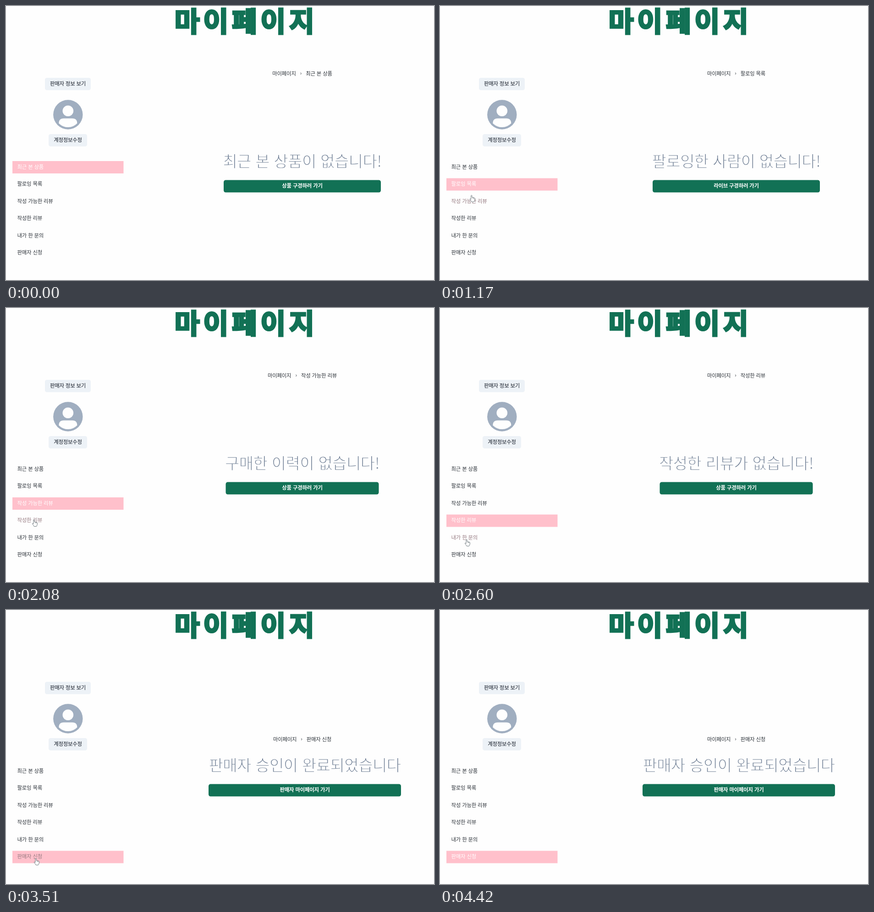
These frames come from a looping animation (934 by 599 pixels, 4550 ms). An HTML page with a canvas:

```html
<!DOCTYPE html>
<html lang="ko">
<head>
<meta charset="utf-8">
<title>마이페이지</title>
<style>
  html, body { margin: 0; width: 100%; height: 100%; overflow: hidden; background: #fefefe; }
  canvas { display: block; }
</style>
</head>
<body>
<canvas id="stage" width="934" height="599"></canvas>
<script>
const ctx = document.getElementById('stage').getContext('2d');
const LOOP = 4550, STEP = 130;
const FAMILY = '"Noto Sans CJK KR", "Noto Sans CJK", "Noto Sans CJK JP", sans-serif';
const PAPER = '#fefefe', GREEN = '#127155', PINK = '#ffc0cb', MIST = '#edf2f7';
const INK = '#2b3138', SLATE = '#718096', AVATAR = '#a0aec0';
const HOVER = [150, 122, 128];
const SMALL = 11.4, TRACKING = -0.019, WORD_GAP = 0.068;

const menu = ['최근 본 상품', '팔로잉 목록', '작성 가능한 리뷰', '작성한 리뷰', '내가 한 문의', '판매자 신청'];
const shop = '상품 구경하러 가기';
const pages = [
  { start: 0, title: '최근 본 상품이 없습니다!', button: shop, width: 343 },
  { start: 910, title: '팔로잉한 사람이 없습니다!', button: '라이브 구경하러 가기', width: 365 },
  { start: 1690, title: '구매한 이력이 없습니다!', button: shop, width: 334 },
  { start: 2340, title: '작성한 리뷰가 없습니다!', button: shop, width: 334 },
  { start: 2860, title: '문의한 내역이 없습니다!', button: shop, width: 334 },
  { start: 3510, title: '판매자 승인이 완료되었습니다', button: '판매자 마이페이지 가기', width: 420, center: 652, crumbY: 283 }
];

// Pointer stops: time, x, y
const pointer = [
  [390, 112, 399], [650, 67, 391], [910, 67, 391], [1300, 72, 431], [1560, 74, 441],
  [1690, 74, 434], [2080, 63, 470], [2340, 62, 468], [2600, 60, 513],
  [2860, 61, 507], [3120, 67, 550], [3770, 67, 550]
];

const smooth = u => u * u * (3 - 2 * u);
const rowY = i => 352 + 37.5 * i;

function pointerAt(t) {
  const i = pointer.findIndex((p, n) => n && t >= pointer[n - 1][0] && t <= p[0]);
  if (i < 0) return null;
  const [t0, x0, y0] = pointer[i - 1], [t1, x1, y1] = pointer[i];
  const u = smooth((t - t0) / (t1 - t0));
  return { x: x0 + (x1 - x0) * u, y: y0 + (y1 - y0) * u };
}

function setFont(weight, size, spacing, wordGap) {
  ctx.font = `${weight} ${size}px ${FAMILY}`;
  ctx.letterSpacing = `${spacing * size}px`;
  ctx.wordSpacing = `${wordGap * size}px`;
}

// Stem width of a weight, in em
const stems = {};
function stemOf(weight) {
  if (!stems[weight]) {
    setFont(weight, 400, 0, 0);
    const m = ctx.measureText('ㅣ');
    stems[weight] = (m.actualBoundingBoxLeft + m.actualBoundingBoxRight) / 400;
  }
  return stems[weight];
}

// Text centred vertically on y; an outline trims or thickens it to the wanted stem
function text(str, x, y, o = {}) {
  const { size = SMALL, weight = 400, stem, color = INK, back = PAPER,
          align = 'left', spacing = TRACKING } = o;
  const extra = stem ? stem - stemOf(weight) * size : 0;
  const base = y + 0.372 * size;
  setFont(weight, size, spacing, WORD_GAP);
  ctx.textAlign = align;
  ctx.fillStyle = color;
  ctx.fillText(str, x, base);
  if (extra) {
    ctx.strokeStyle = extra > 0 ? color : back;
    ctx.lineWidth = Math.abs(extra);
    ctx.lineJoin = 'miter';
    ctx.miterLimit = 2;
    ctx.strokeText(str, x, base);
  }
}

function box(x, y, w, h, r, color) {
  ctx.fillStyle = color;
  ctx.beginPath();
  ctx.roundRect(x, y, w, h, r);
  ctx.fill();
}

function disc(x, y, r, color) {
  ctx.fillStyle = color;
  ctx.beginPath();
  ctx.arc(x, y, r, 0, Math.PI * 2);
  ctx.fill();
}

function profile() {
  const label = { weight: 500, stem: 1.1, color: '#1a202c', back: MIST, align: 'center' };
  box(85, 157, 100, 27, 4.5, MIST);
  text('판매자 정보 보기', 135, 169.7, label);
  box(93, 280, 84, 27, 4.5, MIST);
  text('계정정보수정', 135, 293, label);

  const x = 135.3, y = 237.5, corner = 0.76;
  disc(x, y, 32.2, AVATAR);
  disc(x, 229.3, 11.8, PAPER);
  ctx.beginPath();
  ctx.arc(x, y, 27.6, corner, Math.PI - corner);
  ctx.quadraticCurveTo(x - 20, 245.7, x - 9.5, 245.7);
  ctx.lineTo(x + 9.5, 245.7);
  ctx.quadraticCurveTo(x + 20, 245.7, x + 20, 256.5);
  ctx.fill();
}

function sideMenu(active, age, hand) {
  menu.forEach((label, i) => {
    const y = rowY(i);
    const hovered = hand && Math.abs(hand.y - 5 - y) < 15;
    let color = hovered ? `rgb(${HOVER})` : INK;
    if (i === active) {
      box(14, y - 13, 242.5, 27, 0, PINK);
      const u = Math.min(1, age / 260);
      color = `rgb(${HOVER.map(c => c + (255 - c) * u)})`;
    }
    text(label, 24.5, y - 0.3, { color });
  });
}

function breadcrumb(label, y) {
  const home = '마이페이지', gap = 21.5;
  setFont(400, SMALL, TRACKING, WORD_GAP);
  const homeWidth = ctx.measureText(home).width;
  const left = 646.5 - (homeWidth + gap + ctx.measureText(label).width) / 2;
  text(home, left, y);
  text('›', left + homeWidth + gap / 2, y - 1, { align: 'center' });
  text(label, left + homeWidth + gap, y);
}

function content({ title, button, width, center = 646.5, crumbY = 147.8 }, label) {
  breadcrumb(label, crumbY);
  text(title, center, 339.7, { size: 34.2, weight: 300, stem: 1.95, color: SLATE, align: 'center' });
  box(center - width / 2, 380.5, width, 27, 4.5, GREEN);
  text(button, center, 393, { weight: 700, stem: 1.55, color: '#fff', align: 'center' });
}

function handCursor({ x, y }) {
  ctx.save();
  ctx.translate(x, y);
  ctx.beginPath();
  ctx.moveTo(-3, 2);
  ctx.lineTo(-3, -6);
  ctx.quadraticCurveTo(-2, -8.5, -0.8, -6);
  ctx.lineTo(-0.8, -2.2);
  ctx.lineTo(3.6, -1.4);
  ctx.quadraticCurveTo(5.6, -1, 5.4, 1);
  ctx.quadraticCurveTo(5.4, 5, 3.4, 7.5);
  ctx.lineTo(-1.8, 7.5);
  ctx.quadraticCurveTo(-3, 5, -5.6, 1.6);
  ctx.quadraticCurveTo(-5.4, -0.4, -3, 2);
  ctx.closePath();
  ctx.fillStyle = '#fff';
  ctx.fill();
  ctx.strokeStyle = '#717b80';
  ctx.lineWidth = 1;
  ctx.lineJoin = 'round';
  ctx.stroke();
  ctx.beginPath();
  for (const k of [1.2, 3.2]) {
    ctx.moveTo(k, -1.6);
    ctx.lineTo(k, 0.4);
  }
  ctx.stroke();
  ctx.restore();
}

function draw(now) {
  const t = Math.floor((now % LOOP) / STEP) * STEP;
  const active = pages.findLastIndex(p => t >= p.start);
  const page = pages[active];
  const age = active ? t - page.start : LOOP;
  const hand = pointerAt(t);

  ctx.fillStyle = PAPER;
  ctx.fillRect(0, 0, 934, 599);
  text('마이페이지', 524, 33.2, { size: 60, weight: 900, stem: 12, color: GREEN, align: 'center', spacing: 0.122 });
  profile();
  sideMenu(active, age, hand);
  content(page, menu[active]);
  if (hand) handCursor(hand);
}

const begin = performance.now();
function tick() {
  draw(performance.now() - begin);
  requestAnimationFrame(tick);
}
tick();
</script>
</body>
</html>
```
